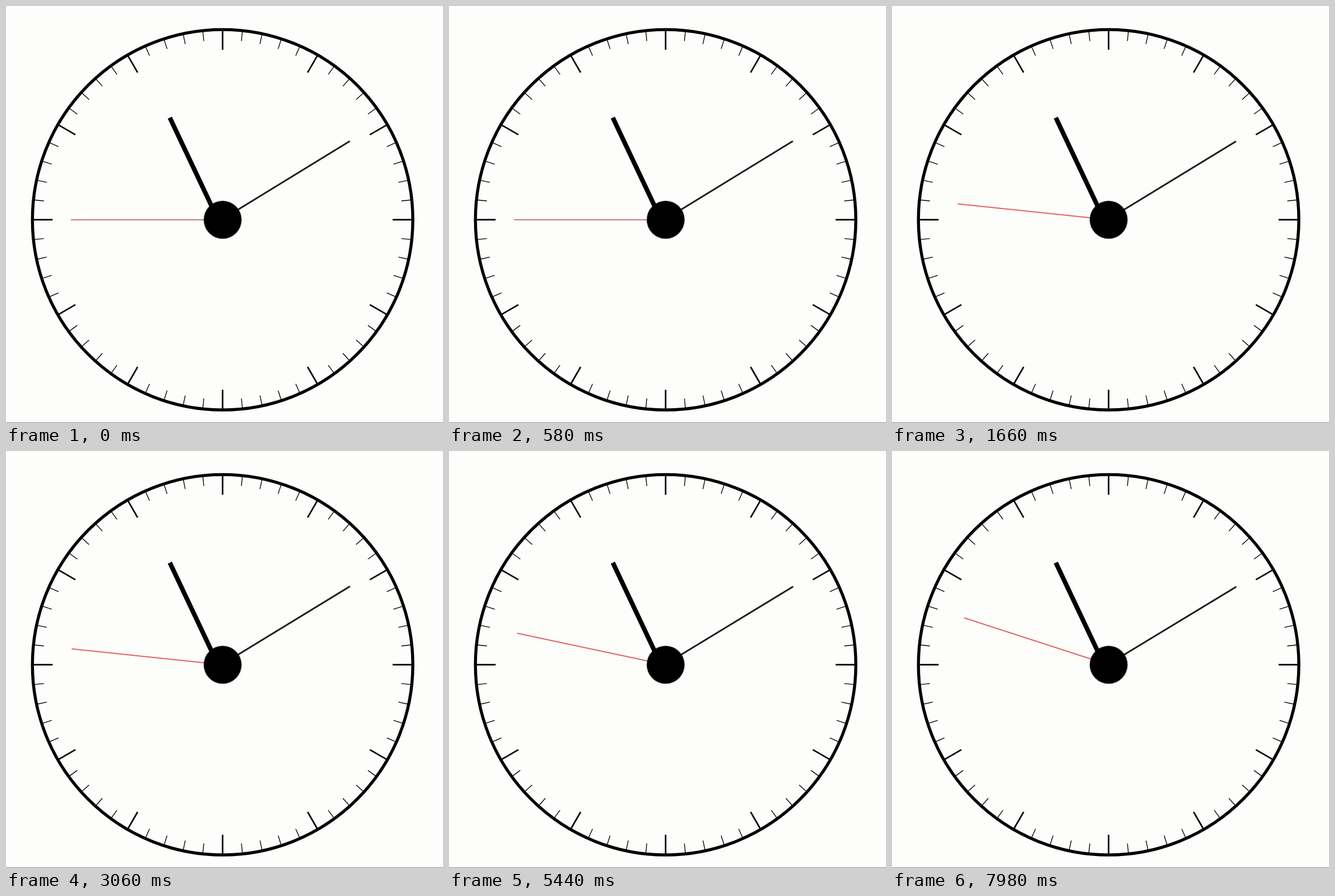
Write an HTML page that moves like this. It is 766 px wide and 731 px high and loops after 8 s.

```html
<!DOCTYPE html>
<html lang="en">
<head>
<meta charset="utf-8">
<title>Clock</title>
<style>
  html, body { margin: 0; width: 100%; height: 100%; overflow: hidden; background: #fdfdfc; }
  svg { display: block; width: 766px; height: 731px; }
  line, circle { stroke: #000; fill: none; }
  .minor { stroke-width: 1.35; }
  .major, .minute { stroke-width: 2.7; }
  .hour { stroke-width: 8; }
  .ring { stroke-width: 5.3; }
  .hub { fill: #000; stroke: none; }
  .floor { stroke: #8f8c74; }
  .second { stroke-width: 1.35; animation: second 8s step-end infinite; }
  .minute { animation: minute 8s step-end infinite; }

  /* one tick every 2.8 s, the first at 1.12 s */
  @keyframes second {
    0%  { transform: rotate(-90deg); stroke: #9a3640; }
    14% { transform: rotate(-84deg); stroke: #d81a1a; }
    49% { transform: rotate(-78deg); stroke: #d81a1a; }
    84%, 100% { transform: rotate(-72deg); stroke: #d81a1a; }
  }
  @keyframes minute {
    0%  { transform: rotate(58.5deg); }
    14% { transform: rotate(58.6deg); }
    49% { transform: rotate(58.7deg); }
    84%, 100% { transform: rotate(58.8deg); }
  }
</style>
</head>
<body>
<svg viewBox="0 0 766 731">
  <line class="floor" x1="0" y1="730.5" x2="766" y2="730.5"/>
  <g transform="translate(379.7 374.7)">
    <g id="ticks"></g>
    <circle class="ring" r="333.4"/>
    <line class="hour" x1="-7.2" x2="-7.2" y2="-201.3" transform="rotate(-25.3)"/>
    <line class="minute" x1="-1" x2="-1" y2="-262.3"/>
    <line class="second" y2="-266"/>
    <circle class="hub" r="33.2"/>
  </g>
</svg>
<script>
  const ticks = document.getElementById('ticks');
  for (let i = 0; i < 60; i++) {
    const major = i % 5 === 0;
    const tick = document.createElementNS(ticks.namespaceURI, 'line');
    tick.setAttribute('class', major ? 'major' : 'minor');
    tick.setAttribute('y1', major ? -298 : -315);
    tick.setAttribute('y2', -332);
    tick.setAttribute('transform', `rotate(${i * 6})`);
    ticks.append(tick);
  }
</script>
</body>
</html>
```
